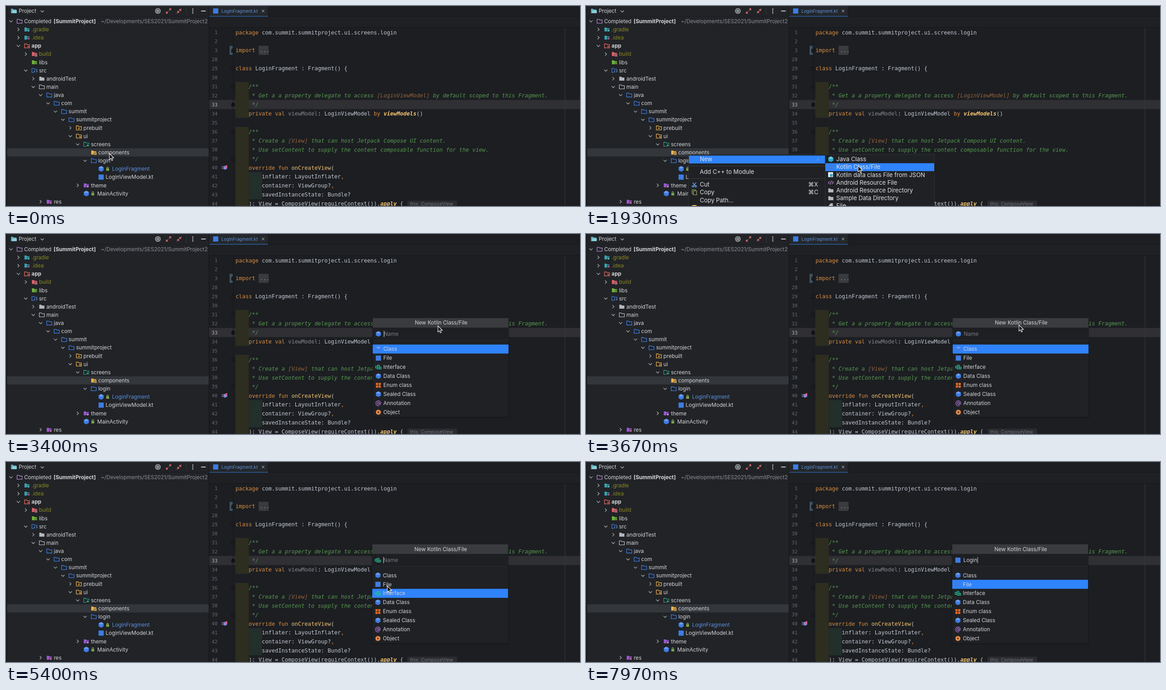
An HTML page for the animation above (8 s loop, 1266 px wide and 442 px high).

```html
<!DOCTYPE html>
<html lang="en">
<head>
<meta charset="utf-8">
<title>New Kotlin file</title>
<style>
html, body { margin: 0; width: 100%; height: 100%; overflow: hidden; background: #1c1e22; }
svg { display: block; width: 1266px; height: 442px; }
text { white-space: pre; font: 11.7px Inter, "Open Sans", "DejaVu Sans", sans-serif; fill: #d3d5d8; }
.menu text { font-size: 12.95px; fill: #e2e3e6; }
.code { font: 12.06px "DejaVu Sans Mono", "Liberation Mono", monospace; }
.num { font-size: 10.5px; text-anchor: end; fill: #676a70; }
.bold { font-weight: 700; }
.w { fill: #c3c8d0; } .o { fill: #d88d42; } .y { fill: #f5c46f; } .p { fill: #84878d; }
.g { fill: #57994f; font-style: italic; } .r { fill: #94623a; font-style: italic; }
.b { fill: #f5c46f; font-style: italic; font-weight: bold; }
</style>
</head>
<body>
<svg id="stage" viewBox="0 0 1266 442" xmlns="http://www.w3.org/2000/svg"></svg>
<script>
const BLUE = '#3d7de4', SELECT = '#2f83fb', MENU = '#1f2125';
const YELLOW = '#eeb04b', TEAL = '#3aa3ad', PURPLE = '#9b57d3', GRAY = '#b4b7bc';

const rect = (x, y, w, h, fill, extra = '') =>
  `<rect x="${x}" y="${y}" width="${w}" height="${h}" fill="${fill}" ${extra}/>`;
const line = (d, color, width = 1.2, extra = '') =>
  `<path d="${d}" fill="none" stroke="${color}" stroke-width="${width}" ${extra}/>`;
const shape = (d, fill) => `<path d="${d}" fill="${fill}"/>`;
const dot = (x, y, r, fill) => `<circle cx="${x}" cy="${y}" r="${r}" fill="${fill}"/>`;
const label = (x, y, str, extra = '') => `<text x="${x}" y="${y + 4.2}" ${extra}>${str}</text>`;
const at = (x, y, body) => `<g transform="translate(${x} ${y})">${body}</g>`;

// Icons are drawn around their own centre.
const folderPath = 'M-5.6 -4.4H-1.4L.2 -2.7H5.6V4.4H-5.6Z';
const solid = color => shape(folderPath, color);
const outline = color => line(folderPath, color, 1.3);
const fourSquares = color => rect(.2, -.6, 6.8, 6.8, '#212327') +
  [[1, 0], [4, 0], [1, 3], [4, 3]].map(([x, y]) => rect(x, y, 2.3, 2.3, color)).join('');
const badge = color => dot(3.2, 2.4, 3.2, '#212327') + dot(3.2, 2.4, 2.2, color);
const square = color => rect(-5.7, -5.7, 11.4, 11.4, color);
const cube = (front = BLUE, top = '#6b9cf0') =>
  shape('M0 -6.2L5.6 -3.2V3.2L0 6.2L-5.6 3.2V-3.2Z', front) + shape('M0 -6.2L5.6 -3.2L0 -.2L-5.6 -3.2Z', top);
const lock = rect(-3, -1, 6, 5, '#8dbb58', 'rx="1"') + line('M-1.8 -1V-2.2A1.8 1.8 0 0 1 1.8 -2.2V-1', '#8dbb58') + rect(-.5, .6, 1, 1.8, '#2b3423');
const tags = color => line('M-2.6 -3L-5.6 0L-2.6 3M2.6 -3L5.6 0L2.6 3M1.2 -4.5L-1.2 4.5', color, 1.3);
const links = line('M-6 -2H-2V2H-6ZM-1.8 -4.4H2.2V0H-1.8ZM2.2 0H6V4H2.2ZM-2 2V4H2', '#25bd91', 1.4);
const enumIcon = [[-5.5, -5], [.5, -5], [-5.5, .8], [.5, .8]].map(([x, y]) => rect(x, y, 4.8, 4.8, '#ed6a1f')).join('');
const atSign = `<circle r="2.3" fill="none" stroke="#b477dc" stroke-width="1.3"/>` +
  line('M2.4 -2.3V1.3Q2.6 3 4.2 2.4Q5.6 1.5 5.3 -1A5.5 5.5 0 1 0 2.8 4.8', '#b477dc', 1.2);
const objectIcon = dot(0, 0, 5.6, '#e78a48') + dot(0, 0, 1.8, '#4a2b1a');

const tree = [
  [0, 'v', outline('#b184cb'), 'Completed'],
  [1, '>', solid(TEAL) + badge('#4fbcc0'), '.gradle', '#8a8820'],
  [1, '>', solid(TEAL) + rect(0, -1, 6.5, 6.5, '#1b2030') + rect(1, 0, 2.6, 4, '#d2485e') + rect(3.6, 0, 2, 4, BLUE), '.idea', '#8a8820'],
  [1, 'v', outline('#e46a5e') + fourSquares('#e46a5e'), 'app', '', 'class="bold"'],
  [2, '>', solid('#e0606b') + fourSquares('#f0939a'), 'build', '#8a8820'],
  [2, '', solid('#6fae3e') + rect(1, 0, 5, 5, '#2b4a1c') + rect(2, 1, 1.2, 3, '#9bd567') + rect(4, 1, 1.2, 3, '#9bd567'), 'libs'],
  [2, 'v', outline(BLUE) + rect(-1.2, -.6, 8, 6, '#212327') + line('M1.4 0L-.6 2L1.4 4M4.2 0L6.2 2L4.2 4', '#75a7f4', 1.1), 'src'],
  [3, '>', solid(GRAY), 'androidTest'],
  [3, 'v', outline(GRAY), 'main'],
  [4, 'v', outline(BLUE), 'java'],
  [5, 'v', outline(BLUE), 'com'],
  [6, 'v', outline(BLUE), 'summit'],
  [7, 'v', outline(BLUE), 'summitproject'],
  [8, '>', outline(YELLOW) + dot(0, .8, 1.5, YELLOW), 'prebuilt'],
  [8, 'v', outline(YELLOW) + fourSquares(YELLOW), 'ui'],
  [9, 'v', outline('#2fa086') + badge('#2fa086'), 'screens'],
  [10, '', solid(YELLOW) + fourSquares('#ffd078'), 'components'],
  [10, 'v', outline(BLUE), 'login'],
  [11, '', cube(), 'LoginFragment', '#5b91dc', '', lock],
  [11, '', square(BLUE), 'LoginViewModel.kt'],
  [9, '>', solid(PURPLE) + badge('#c58cf0'), 'theme'],
  [9, '', cube(), 'MainActivity', '', '', lock],
  [4, '>', solid(PURPLE) + badge('#d26f9d'), 'res'],
];

// Each code segment starts with the letter of its colour class.
const code = [
  [1, 'opackage |wcom.summit.summitproject.ui.screens.login'],
  [2, ''], [3, 'oimport '], [28, ''],
  [29, 'oclass |wLoginFragment : Fragment() {'],
  [30, ''], [31, 'g    /**'],
  [32, 'g     * Get a a property delegate to access |r[LoginViewModel]|g by default scoped to this Fragment.'],
  [33, 'g     */'],
  [34, 'o    private val |pviewModel|w: LoginViewModel |oby |bviewModels|w()'],
  [35, ''], [36, 'g    /**'],
  [37, 'g     * Create a |r[View]|g that can host Jetpack Compose UI content.'],
  [38, 'g     * Use setContent to supply the content composable function for the view.'],
  [39, 'g     */'],
  [40, 'o    override fun |yonCreateView|w('],
  [41, 'w        inflater: LayoutInflater|o,'],
  [42, 'w        container: ViewGroup?|o,'],
  [43, 'w        savedInstanceState: Bundle?'],
  [44, 'w    ): View = ComposeView(requireContext()).|bapply|w {'],
];

function drawTree() {
  let out = rect(0, 0, 448, 442, '#212327') + rect(0, 0, 2.5, 442, '#17181b') + rect(2.5, 22, 445, 1, '#1a1c1f');
  out += at(17, 11, shape('M-6 -5H-1.6L0 -3.3H6V5H-6Z', '#58a9b8') + rect(-3.6, -1.4, 10.4, 6, '#8bd0da'));
  out += label(28, 11, 'Project') + line('M76.5 10L80 13.5L83.5 10', '#aeb1b6', 1.3);
  out += at(335, 11, `<circle r="5.4" fill="none" stroke="#d3d5d8" stroke-width="1.3"/><circle r="2.6" fill="none" stroke="#d3d5d8" stroke-width="1.2"/>` + dot(0, 0, 1, '#d3d5d8'));
  out += at(358.5, 11, line('M1 -1L5 -5M1.6 -5H5V-1.6M-1 1L-5 5M-1.6 5H-5V1.6', '#e8756f', 1.3));
  out += at(382, 11, line('M1 -1L5 -5M1 -4.4V-1H4.4M-1 1L-5 5M-1 4.4V1H-4.4', '#e8756f', 1.3));
  out += rect(397, 4, 1, 15, '#34363a') + [6.7, 11, 15.3].map(y => dot(412, y, 1.3, '#d3d5d8')).join('') + rect(430.5, 10.2, 10, 1.8, '#d3d5d8');
  out += rect(2.5, 314.5, 445, 18, '#33363a');
  tree.forEach(([depth, arrow, icon, name, color, extra = '', mark], i) => {
    const x = 16.35 * depth, y = 33.7 + 18.13 * i;
    if (arrow) out += at(11 + x, y, line(arrow === 'v' ? 'M-3.5 -1.8L0 1.8L3.5 -1.8' : 'M-1.8 -3.5L1.8 0L-1.8 3.5', '#a9acb1', 1.3));
    out += at(30 + x, y, icon);
    if (mark) out += at(44.3 + x, y, mark);
    out += label((mark ? 54.2 : 40) + x, y, name, `${color ? `style="fill:${color}"` : ''} ${extra}`);
  });
  return out + label(105, 33.7, '[SummitProject]', 'class="bold"') +
    label(209.5, 33.7, '~/Developments/SES2021/SummitProject2', 'style="fill:#8b8e94"');
}

function drawEditor() {
  let out = rect(447, 0, 819, 442, '#1c1e22') + rect(447, 0, 1.2, 442, '#141518');
  out += rect(448, 0, 130, 22, '#24272b') + rect(448, 23, 818, 1, '#17191c') + rect(448, 22, 130, 1.4, '#3068b0') + rect(578, 0, 1, 22, '#16171a');
  out += rect(448, 24, 818, 23, '#1e2024') + rect(448, 47, 818, 1, '#15171a');
  out += at(462.5, 11, square(BLUE)) + label(475, 10.8, 'LoginFragment.kt', 'style="font-size:9.7px;fill:#5b91dc"') + line('M564.3 8.3L569.7 13.7M569.7 8.3L564.3 13.7', '#9da0a5', 1.1);
  out += rect(448, 207.7, 818, 20, '#303034') + rect(500.5, 48, 1, 394, '#141619');
  out += rect(506, 167.7, 29.5, 79.6, '#2d2d20') + rect(506, 267, 29.5, 175, '#2d2d20') + rect(535.5, 367, 29, 60, '#232f2a');
  out += rect(1232.5, 48, 1, 394, '#393b3f') + rect(493, 88, 7, 20, '#40515f') + rect(557, 88, 22, 20, '#393b3e');
  code.forEach(([num, src], i) => {
    const y = 58.4 + 19.93 * i;
    const spans = src && src.split('|').map(s => `<tspan class="${s[0]}">${s.slice(1)}</tspan>`).join('');
    out += label(466.5, y - .2, num, `class="code num" ${num === 33 ? 'style="fill:#b5b8bd"' : ''}`);
    if ([3, 29, 31, 33, 36, 39].includes(num))
      out += at(501, y, `<path d="M-3.5 -2.5L0 -4.5L3.5 -2.5V4H-3.5Z" fill="${num === 33 ? '#111214' : '#1a1b1e'}" stroke="#111316"/>`);
    if (spans) out += label(506.3, y, spans, 'class="code"');
  });
  out += label(560, 97.6, '...', 'class="code" style="fill:#969a9f"');
  out += at(482, 357, line('M-6.5 -2.5H-2M-6.5 0H-2M-6.5 2.5H-2', '#8f8bd0', 1.1) + shape('M1.5 -4L6 -5V2L1.5 5L-2 3V-2.5Z', '#8a86da') + shape('M1.5 -4L6 -5.5V0L2.5 0Z', '#dd5f74'));
  return out + rect(885, 430, 110, 13, '#2a2c30', 'rx="4"') + label(891, 436.5, 'this: ComposeView', 'style="font-size:10.5px;fill:#74777d"');
}

function drawMenu() {
  const sep = y => rect(227, y, 300, 1, '#3c3e43');
  return rect(226, 328, 302, 116, MENU, 'stroke="#3a3c40" stroke-width=".7"') +
    `<rect id="newRow" x="227" y="330.5" width="300" height="17.5" fill="${SELECT}"/>` +
    label(251, 339, 'New') + line('M509.5 336L512.3 339L509.5 342', '#63a5f2') + sep(353) +
    label(251, 367, 'Add C++ to Module') + sep(381) + label(251, 395, 'Cut') + label(490, 395, '⌘X') +
    label(251, 412, 'Copy') + label(490, 412, '⌘C') + label(251, 429.5, 'Copy Path...') +
    at(239, 395, line('M-4 -5L3 3M4 -5L-3 3', '#6ba6ef', 1.3) + line('M-5 3.5a2 1.8 0 1 0 4 0a2 1.8 0 1 0 -4 0M1 3.5a2 1.8 0 1 0 4 0a2 1.8 0 1 0 -4 0', '#6ba6ef', 1.2)) +
    at(239, 412, line('M-2 -3.5H5V5.5H-2ZM-2 3H-5V-6H2V-3.5', '#a5b56b', 1.2)) +
    rect(234, 440, 10, 6, YELLOW, 'rx="1"');
}

function drawSubmenu() {
  const items = [
    [cube('#2fa9c5', '#6cd3e4'), 'Java Class'],
    [square(BLUE), 'Kotlin Class/File'],
    [rect(-6, -6, 11, 11, '#e3eaf2') + rect(-2, -2, 6, 6, '#37a9c8'), 'Kotlin data class File from JSON'],
    [tags('#c08be2'), 'Android Resource File'],
    [solid(GRAY), 'Android Resource Directory'],
    [solid(GRAY), 'Sample Data Directory'],
    [shape('M-4.5 -1L-.5 -6H4.5V6H-4.5Z', GRAY), 'File'],
  ];
  return rect(527.5, 328, 240.5, 116, MENU, 'stroke="#3a3c40" stroke-width=".7"') +
    `<rect id="subRow" x="528" width="240" height="17.5" fill="${SELECT}"/>` +
    items.map(([icon, name], i) => at(540, 338.8 + 17.2 * i, icon) + label(552, 339 + 17.2 * i, name)).join('');
}

const kinds = [
  [cube(), 'Class'], [square(BLUE), 'File'], [links, 'Interface'], [cube(), 'Data Class'],
  [enumIcon, 'Enum class'], [cube(), 'Sealed Class'], [atSign, 'Annotation'], [objectIcon, 'Object'],
];
const kindY = i => 68.4 + 19.94 * i;

function drawDialog() {
  return rect(-2, 2, 303, 219, '#000', 'opacity=".18" rx="2"') + rect(0, 0, 299.5, 218, '#1f2125') +
    rect(0, 0, 299.5, 21, '#393b3e') + label(151, 10.3, 'New Kotlin Class/File', 'text-anchor="middle"') +
    rect(0, 21, 299.5, 27, '#1d1f23') + rect(0, 48, 299.5, 1, '#292b2f') +
    `<g id="kindIcon"></g>` + label(24.5, 35, '', 'id="name"') + '<rect id="caret" y="28" width="1" height="14" fill="#d3d5d8"/>' +
    `<rect id="kindRow" width="299.5" height="19.9" fill="${SELECT}"/>` +
    kinds.map(([icon, name], i) => at(12.5, kindY(i), icon) + label(23.5, kindY(i), name)).join('');
}

const stage = document.getElementById('stage');
const beamPath = 'M-3 -7Q0 -7 0 -5Q0 -7 3 -7M0 -5V5M-3 7Q0 7 0 5Q0 7 3 7M-1.5 3H1.5';
stage.innerHTML = drawTree() + drawEditor() +
  `<g id="menu" class="menu">${drawMenu()}</g><g id="submenu" class="menu">${drawSubmenu()}</g>` +
  `<g id="dialog">${drawDialog()}</g>` +
  `<path id="arrow" d="M0 0V13.6L3.2 10.7L5.3 15.4L7.5 14.4L5.5 9.8H9.8Z" fill="#0b0b0c" stroke="#fff" stroke-width="1.1"/>` +
  `<g id="beam">${line(beamPath, '#000', 2.6)}${line(beamPath, '#fff', 1.2)}</g>`;

const el = Object.fromEntries([...stage.querySelectorAll('[id]')].map(e => [e.id, e]));
const show = (node, on) => node.setAttribute('display', on ? 'inline' : 'none');
const place = (node, x, y) => node.setAttribute('transform', `translate(${x} ${y})`);

const pointerPath = [
  [0, 228, 326], [600, 228, 326], [800, 262, 338], [1150, 592, 334], [1250, 592, 334], [1600, 600, 353], [2500, 600, 353],
  [3100, 940, 214], [3500, 955, 201], [3800, 955, 201], [4200, 954, 197], [4800, 842, 289], [5050, 842, 289],
  [5400, 841, 274], [5700, 841, 270], [6150, 841, 268], [6550, 871, 224], [8000, 871, 224],
];

function pointerAt(t) {
  const i = pointerPath.findIndex(p => p[0] > t);
  const [t0, x0, y0] = pointerPath[i - 1], [t1, x1, y1] = pointerPath[i];
  const u = (t - t0) / (t1 - t0), k = u * u * (3 - 2 * u);
  return [x0 + (x1 - x0) * k, y0 + (y1 - y0) * k];
}

let shownKind = -1;
function render(t) {
  const [x, y] = pointerAt(t);
  const overField = t > 6150 && y < 231;
  const pointerOn = (t < 2500 || t >= 3100) && t < 7050;
  place(el.arrow, x, y);
  place(el.beam, x, y);
  show(el.arrow, pointerOn && !overField);
  show(el.beam, pointerOn && overField);

  show(el.menu, t >= 480 && t < 2500);
  show(el.newRow, t >= 680);
  show(el.submenu, t >= 860 && t < 2500);
  show(el.subRow, x > 528);
  el.subRow.setAttribute('y', y > 347 ? 347.4 : 330.4);

  const drag = Math.min(1, Math.max(0, (t - 3800) / 400));
  const ease = 1 - drag * drag * (3 - 2 * drag);
  show(el.dialog, t >= 3100);
  place(el.dialog, 807.8 + ease, 182 + 3.9 * ease);

  const kind = t < 4900 ? 0 : t < 5500 ? 2 : 1;
  if (kind !== shownKind) {
    el.kindIcon.innerHTML = at(12.5, 35, kinds[kind][0]);
    el.kindRow.setAttribute('y', kindY(kind) - 10);
    shownKind = kind;
  }
  const typed = 'Login'.slice(0, Math.max(0, Math.floor((t - 7100) / 170) + 1));
  el.name.textContent = typed || 'Name';
  el.name.style.fill = typed ? '#d3d5d8' : '#797c82';
  show(el.caret, typed || Math.floor(t / 500) % 2 === 0);
  el.caret.setAttribute('x', 24.5 + (typed ? el.name.getComputedTextLength() + .5 : 0));
}

const start = performance.now();
function tick() {
  render((performance.now() - start) % 8000);
  requestAnimationFrame(tick);
}
tick();
</script>
</body>
</html>
```
